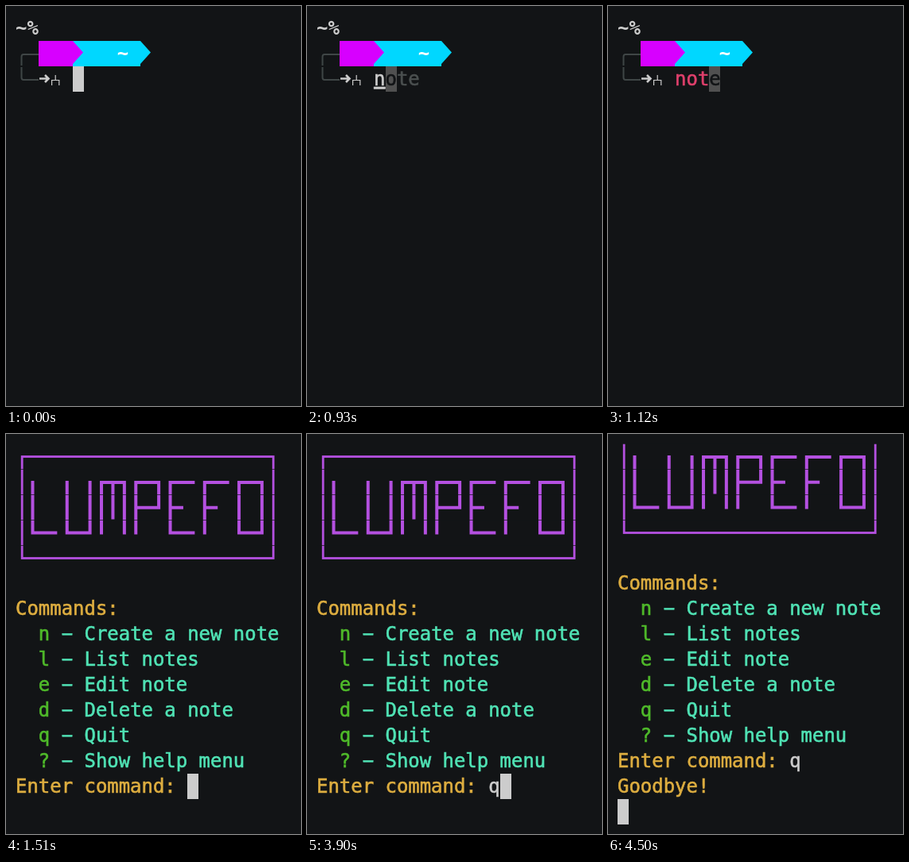
Animation of 371x504 px, one loop 4560 ms. Source, as an HTML page:

```html
<!DOCTYPE html>
<html lang="en">
<head>
<meta charset="utf-8">
<title>Terminal notes</title>
<style>
  html, body { margin: 0; height: 100%; overflow: hidden; background: #121416; }
  svg { display: block; width: 100vw; height: 100vh; }
  text { font: 23.95px "DejaVu Sans Mono", monospace; white-space: pre; color: #ccc; }
  text, tspan { fill: currentColor; stroke: currentColor; stroke-width: .6px; }
  .bold { font-weight: bold; stroke: none; }
  .gold { color: #deae40; }
  .green { color: #4fba2a; }
  .teal { color: #50e3b5; }
  .red { color: #e0406c; }
  .hint { color: #4b5050; }
  .dark { color: #121416; }
  .prefix { text-decoration: underline; }
  .line { fill: none; stroke: #ccc; }
  .logo { fill: none; stroke: #b450e0; stroke-width: 2.8; }
  .logo path { stroke-width: 4; stroke-linecap: square; vector-effect: non-scaling-stroke; }
</style>
</head>
<body>
<svg viewBox="0 0 371 504">
  <clipPath id="screen"><rect y="12" width="371" height="480"/></clipPath>

  <g id="shell">
    <text class="bold" x="12" y="36" style="font-style: italic">~%</text>
    <path class="line" style="stroke: #3f4646" stroke-width="2"
      d="M41 61H22Q19.5 61 19.5 64V75M19.5 77V90Q19.5 93 22 93H41"/>
    <path fill="#d700ff" d="M41 44H85V76H41Z"/>
    <path fill="#00d7ff" d="M84 44H169L182 58.5 169 73V76H84Z"/>
    <path fill="#d700ff" d="M84 44L97 58.5 84 73Z"/>
    <text class="bold" x="139.7" y="68" style="color: #fff">~</text>
    <path class="line" stroke-width="2.6" d="M42 91.5H53M49 87L53.5 91.5 49 96"/>
    <path class="line" stroke-width="1.2" d="M62.2 87V93.5M57.6 100V93.5H66.8V100"/>
    <rect id="shellCursor" width="14" height="32"/>
    <text id="input" x="84.1" y="100"></text>
  </g>

  <g clip-path="url(#screen)">
    <g id="app">
      <g class="logo" id="logo">
        <rect x="20.2" y="28.5" width="316" height="128"/>
      </g>
      <path stroke="#121416" stroke-opacity=".7" d="M12 44.5H343M12 76.5H343M12 108.5H343M12 140.5H343"/>
      <text class="gold" x="12" y="228">Commands:</text>
      <g id="menu"></g>
      <text class="gold" x="12" y="452">Enter command:</text>
      <text id="answer" x="228.3" y="452">q</text>
      <text id="farewell" class="gold" x="12" y="484">Goodbye!</text>
      <rect id="appCursor" width="14" height="32" fill="#ccc"/>
    </g>
  </g>
</svg>
<script>
  const LOOP = 4560, CELL = 14.42, COMMAND = "note";
  const KEY_TIMES = [930, 990, 1120, 1250];
  const APP_START = 1510, ANSWER = 3900, QUIT = 4500;
  const $ = id => document.getElementById(id);
  const show = (id, on) => $(id).setAttribute("visibility", on ? "inherit" : "hidden");
  const span = (text, style) => `<tspan class="${style}">${text}</tspan>`;

  function placeCursor(id, column, y) {
    $(id).setAttribute("x", Math.round(12 + column * CELL));
    $(id).setAttribute("y", y);
  }

  // Letters are drawn on a grid of 3 columns by 3 rows.
  const strokes = {
    L: "M0 0V2H2", U: "M0 0V2H2V0", M: "M0 2V0H2V2M1 0V1.4", P: "M0 2V0H2V1H0",
    E: "M2 0H0V2H2M0 1H1", F: "M2 0H0V2M0 1H1", O: "M0 0H2V2H0Z"
  };
  $("logo").innerHTML += [..."LUMPEFO"].map((letter, i) =>
    `<path transform="translate(${33.5 + i * 3 * CELL} 61) scale(${CELL} 31.8)" d="${strokes[letter]}"/>`
  ).join("");

  const commands = {
    n: "Create a new note", l: "List notes", e: "Edit note",
    d: "Delete a note", q: "Quit", "?": "Show help menu"
  };
  $("menu").innerHTML = Object.entries(commands).map(([key, label], i) =>
    `<text x="${12 + 2 * CELL}" y="${260 + 32 * i}">${span(key, "green")}${span(" − " + label, "teal")}</text>`
  ).join("");

  function drawShell(t) {
    const count = KEY_TIMES.filter(time => t >= time).length;
    const rest = count ? COMMAND.slice(count) : "";
    $("input").innerHTML = span(COMMAND.slice(0, count), count > 1 ? "red" : "prefix")
      + span(rest.slice(0, 1), "dark") + span(rest.slice(1), "hint");
    $("shellCursor").setAttribute("fill", rest ? "#505050" : "#ccc");
    placeCursor("shellCursor", 5 + count, 76);
  }

  function drawApp(t) {
    const answered = t >= ANSWER, quit = t >= QUIT;
    show("answer", answered);
    show("farewell", quit);
    $("app").setAttribute("transform", `translate(0 ${quit ? -32 : 0})`);
    if (quit) placeCursor("appCursor", 0, 492);
    else placeCursor("appCursor", answered ? 16 : 15, 428);
  }

  const start = performance.now();
  function frame() {
    const t = (performance.now() - start) % LOOP;
    const inApp = t >= APP_START;
    $("shell").style.display = inApp ? "none" : "";
    $("app").style.display = inApp ? "" : "none";
    (inApp ? drawApp : drawShell)(t);
    requestAnimationFrame(frame);
  }
  frame();
</script>
</body>
</html>
```
